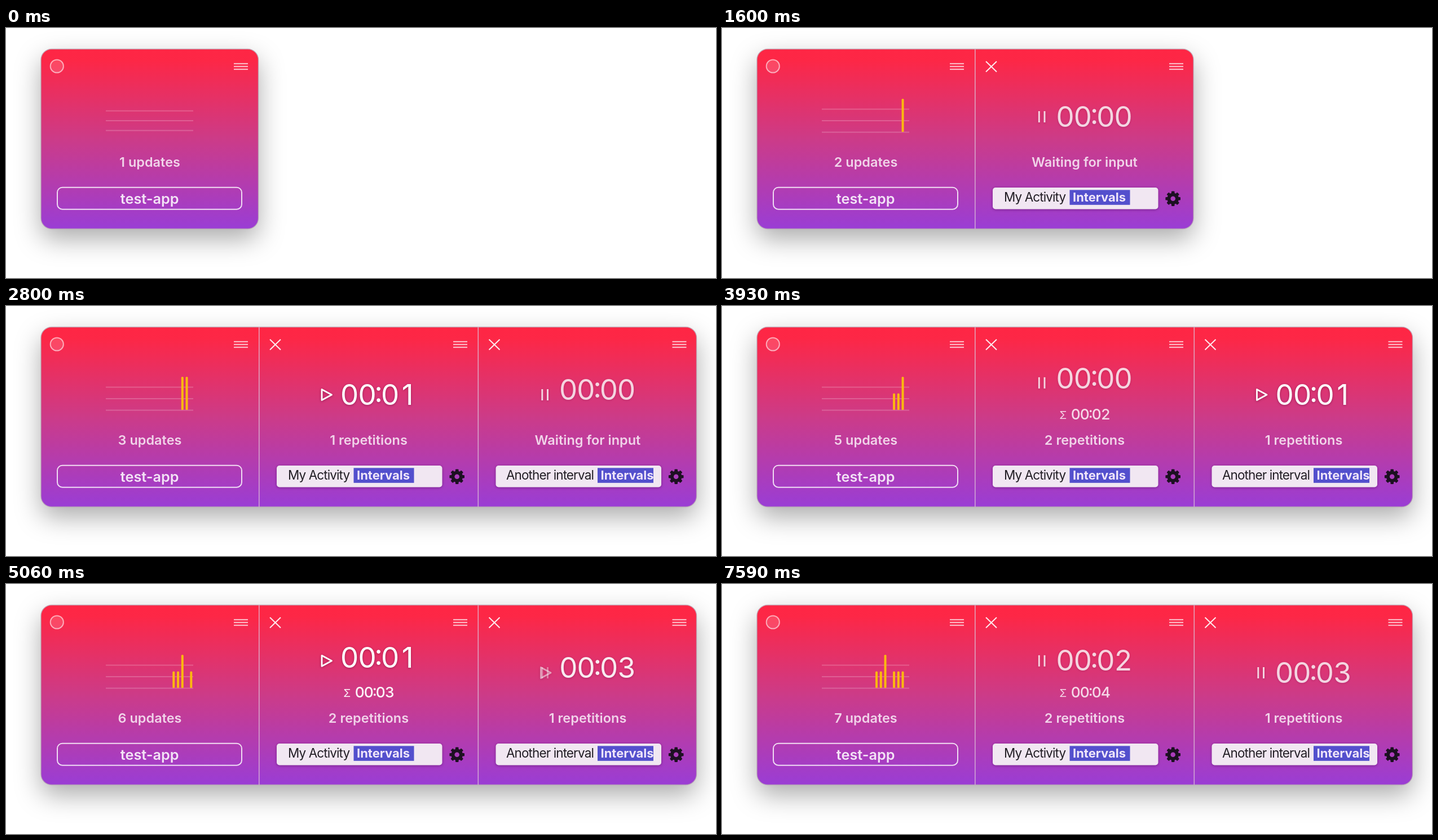
These frames come from a looping animation (1259 px wide and 445 px high, 7690 ms). An HTML page with a canvas:

```html
<!DOCTYPE html>
<html lang="en">
<head>
<meta charset="utf-8">
<title>Interval timers</title>
<style>
  html, body { margin: 0; width: 100%; height: 100%; overflow: hidden; background: #fff; }
  canvas { display: block; }
</style>
</head>
<body>
<canvas id="stage" width="1259" height="445"></canvas>
<script>
const ctx = document.getElementById('stage').getContext('2d');
const LOOP = 7690;
const PITCH = 388.5;
const TOP = 37.5, BOTTOM = 357.5, LEFT = 62;
const FONT = 'Inter, "Noto Sans", sans-serif';
const white = a => `rgba(255,255,255,${a})`;

// Chart buckets move one slot per second.
const FIRST_TICK = 590, TICK = 1000;
const hits = [600, 1790, 3330, 3400, 4860, 5860, 6730];
const updates = [[0, 1], [530, 2], [2530, 3], [3330, 4], [3400, 5], [4860, 6], [5860, 7]];

// Each step: start, playing, seconds, hop height, label, running sum
const WAIT = 'Waiting for input', ONE = '1 repetitions', TWO = '2 repetitions';
const timers = [
  {
    name: 'My Activity', textX: 500, tagX: 616.5,
    steps: [
      [800, 0, 0, 10, WAIT],
      [1790, 1, 0, 5, ONE],
      [1860, 1, 1, 5, ONE],
      [2860, 1, 2, 5, ONE],
      [3330, 0, 2, 10, ONE],
      [3830, 0, 0, 10, TWO, 2],
      [4000, 1, 0, 5, TWO, 2],
      [4860, 1, 1, 5, TWO, 3],
      [5860, 1, 2, 5, TWO, 4],
      [6730, 0, 2, 10, TWO, 4]
    ]
  },
  {
    name: 'Another interval', textX: 498.5, tagX: 660.5,
    steps: [
      [2530, 0, 0, 10, WAIT],
      [3330, 1, 0, 5, ONE],
      [3470, 1, 1, 5, ONE],
      [4270, 1, 2, 5, ONE],
      [4930, 0, 3, 10, ONE]
    ]
  }
];

function lastIndex(list, t) {
  let i = -1;
  while (i + 1 < list.length && list[i + 1][0] <= t) i++;
  return i;
}

function text(str, x, y, size, weight, color, align = 'center', spacing = 0) {
  ctx.font = `${weight} ${size}px ${FONT}`;
  ctx.letterSpacing = spacing + 'px';
  ctx.textAlign = align;
  ctx.fillStyle = color;
  ctx.fillText(str, x, y);
}

function line(x1, y1, x2, y2, width, color, cap = 'butt') {
  ctx.beginPath();
  ctx.moveTo(x1, y1);
  ctx.lineTo(x2, y2);
  ctx.lineWidth = width;
  ctx.lineCap = cap;
  ctx.strokeStyle = color;
  ctx.stroke();
}

function box(x, y, w, h, r) {
  ctx.beginPath();
  ctx.roundRect(x, y, w, h, r);
}

function shadow(color, blur, dy) {
  ctx.shadowColor = color;
  ctx.shadowBlur = blur;
  ctx.shadowOffsetY = dy;
}

const noShadow = () => shadow('transparent', 0, 0);

function drawCard(panels) {
  const w = 385.5 + (panels - 1) * PITCH;
  const h = BOTTOM - TOP;
  const fill = ctx.createLinearGradient(0, TOP, 0, BOTTOM);
  fill.addColorStop(0, '#ff2644');
  fill.addColorStop(0.06, '#fd2746');
  fill.addColorStop(0.5, '#cc3b88');
  fill.addColorStop(1, '#9a3dd5');
  shadow('rgba(0,0,0,0.33)', 46, 18);
  box(LEFT, TOP, w, h, 19);
  ctx.fillStyle = fill;
  ctx.fill();
  noShadow();
  box(LEFT, TOP, w, h, 19);
  ctx.lineWidth = 1.4;
  ctx.strokeStyle = 'rgba(185,165,180,0.8)';
  ctx.stroke();
  for (let i = 1; i < panels; i++) {
    const x = 60.3 + i * PITCH;
    line(x, TOP, x, BOTTOM, 1.6, 'rgba(222,190,214,0.8)');
  }
}

function drawMenu(x) {
  for (const y of [63.5, 68.5, 73.5]) line(x, y, x + 25, y, 1.7, white(0.85));
}

function drawChart(t) {
  const now = Math.floor((t - FIRST_TICK) / TICK);
  const counts = {};
  for (const e of hits) {
    if (e > t) continue;
    const k = Math.floor((e - FIRST_TICK) / TICK);
    counts[k] = (counts[k] || 0) + 1;
  }
  const max = Math.max(0, ...Object.values(counts));
  const gap = max ? 20.5 : 17.5;
  for (let i = -1; i <= 1; i++) line(177, 165 + i * gap, 332, 165 + i * gap, 1.8, white(0.2));
  for (const k in counts) {
    const h = 59 * counts[k] / max;
    box(326.3 - (now - k) * 7.75, 185 - h, 4, h, 1.6);
    ctx.fillStyle = '#fbb80f';
    ctx.fill();
  }
}

function drawApp(t) {
  ctx.beginPath();
  ctx.arc(90.3, 68, 11.6, 0, Math.PI * 2);
  ctx.fillStyle = white(0.15);
  ctx.fill();
  ctx.lineWidth = 2;
  ctx.strokeStyle = white(0.58);
  ctx.stroke();
  drawMenu(404);
  drawChart(t);
  const count = updates[lastIndex(updates, t)][1];
  text(`${count} updates`, 255, 247, 23.5, 600, white(0.78));
  box(91, 283.7, 327, 39, 9);
  ctx.lineWidth = 2;
  ctx.strokeStyle = white(0.82);
  ctx.stroke();
  text('test-app', 254.7, 312.5, 25.3, 600, white(0.86));
}

// Fixed cells keep the digits from shifting.
function drawClock(sec, x, y, size, weight, color) {
  const s = size / 51;
  const cells = [-51.5, -20.2, 0, 20.3, 51.5];
  [...'00:0' + sec].forEach((ch, i) => {
    const lift = ch === ':' ? 4.5 * s : 0;
    text(ch, x + cells[i] * s, y + (18.5 * s) - lift, size, weight, color);
  });
}

function drawPlay(y, alpha) {
  ctx.beginPath();
  ctx.moveTo(560, y - 9.5);
  ctx.lineTo(577.5, y);
  ctx.lineTo(560, y + 9.5);
  ctx.closePath();
  ctx.lineJoin = 'round';
  ctx.lineWidth = 2.8;
  ctx.strokeStyle = white(alpha);
  ctx.stroke();
}

function drawPause(y, alpha) {
  for (const x of [562.3, 572]) line(x, y - 10, x, y + 10, 2.9, white(alpha));
}

function drawGear(x, y) {
  ctx.fillStyle = '#1d1022';
  ctx.beginPath();
  ctx.arc(x, y, 10.3, 0, Math.PI * 2);
  ctx.arc(x, y, 4.3, 0, Math.PI * 2, true);
  ctx.fill();
  for (let i = 0; i < 8; i++) {
    ctx.save();
    ctx.translate(x, y);
    ctx.rotate(i * Math.PI / 4);
    box(-2.8, -13.3, 5.6, 5.5, 1.2);
    ctx.fill();
    ctx.restore();
  }
}

function drawInput(timer) {
  shadow('rgba(60,0,70,0.45)', 5, 1);
  box(480, 284, 293.5, 38.5, 5);
  ctx.fillStyle = '#f1e7f2';
  ctx.fill();
  noShadow();
  ctx.save();
  ctx.beginPath();
  ctx.rect(490, 284, 269.5, 39);
  ctx.clip();
  text(timer.name, timer.textX, 309, 22.5, 400, '#211d24', 'left', -0.9);
  ctx.fillStyle = '#534fcd';
  ctx.fillRect(timer.tagX, 288.3, 107, 26.5);
  text('Intervals', timer.tagX + 5.5, 309, 22, 700, '#f0e6fa', 'left');
  ctx.restore();
  drawGear(799.7, 303.7);
}

function drawTimer(timer, t) {
  const i = lastIndex(timer.steps, t);
  const [start, playing, sec, hop, label, sum] = timer.steps[i];
  const wasPlaying = i > 0 ? timer.steps[i - 1][1] : playing;
  const age = t - start;
  const mix = Math.min(1, age / 280);
  const live = wasPlaying + (playing - wasPlaying) * mix;
  const lift = age < 400 ? hop * Math.sin(Math.PI * age / 400) : 0;
  const y = sum ? 135.3 : 157;
  const iconY = sum ? 136.8 : 158;
  const bright = 0.8 + 0.2 * live;

  line(468, 59.5, 487, 78, 2, white(0.9));
  line(487, 59.5, 468, 78, 2, white(0.9));
  drawMenu(793);

  shadow(`rgba(70,0,40,${0.25 + 0.15 * live})`, 4, 1);
  if (live > 0) drawPlay(iconY, live);
  if (live < 1) drawPause(iconY, 0.8 * (1 - live));
  drawClock(sec, 660 + 0.7 * live, y - lift, 51, 400, white(bright));
  noShadow();
  if (sum) {
    const tone = white(0.8 + 0.15 * live);
    text('Σ', 604.7, 200.5, 19, 400, tone);
    drawClock(sum, 653.7, 192, 26.3, 500, tone);
  }
  text(label, 643, 247, 23.5, 600, white(0.78));
  drawInput(timer);
}

function draw(t) {
  ctx.clearRect(0, 0, 1259, 445);
  const shown = timers.filter(timer => t >= timer.steps[0][0]);
  drawCard(1 + shown.length);
  drawApp(t);
  shown.forEach((timer, i) => {
    ctx.save();
    ctx.translate(i * PITCH, 0);
    drawTimer(timer, t);
    ctx.restore();
  });
}

const begin = performance.now();
function frame() {
  draw((performance.now() - begin) % LOOP);
  requestAnimationFrame(frame);
}
frame();
</script>
</body>
</html>
```
